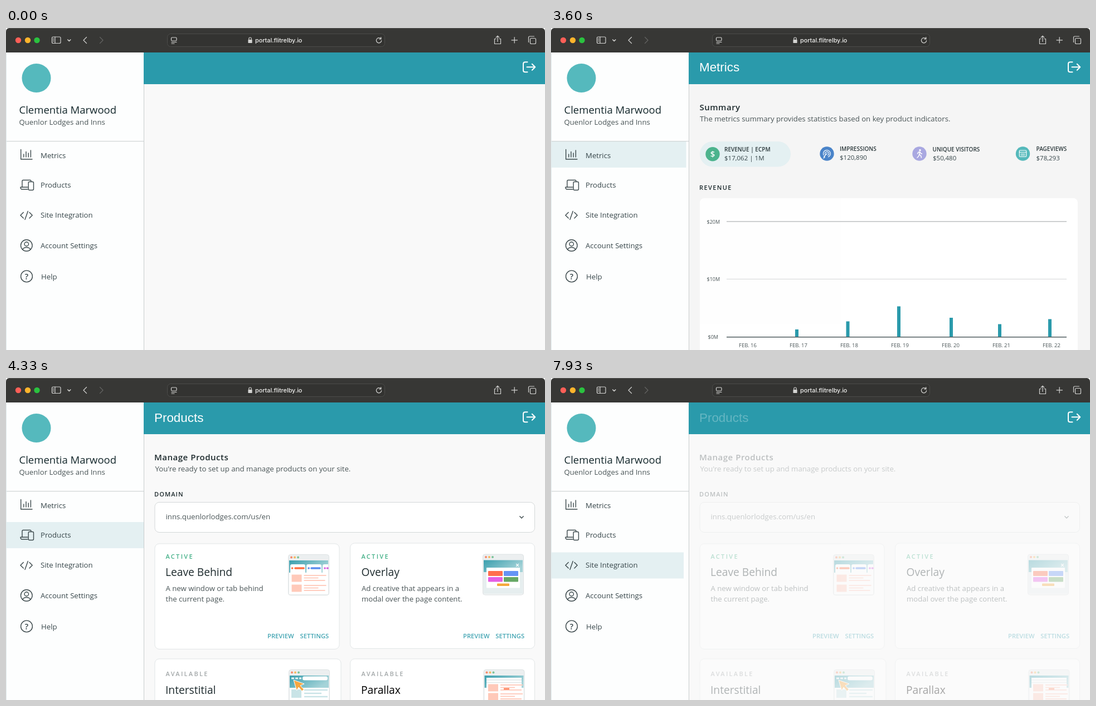
An HTML page that plays this animation: 967 px wide and 579 px high, repeating every 8 s.

```html
<!DOCTYPE html>
<html lang="en">
<head>
<meta charset="utf-8">
<title>Partner dashboard</title>
<style>
html, body { margin: 0; width: 100%; height: 100%; overflow: hidden; background: #fff; }
svg { display: block; width: 100vw; height: 100vh; }
text { font: 13.2px "Open Sans", sans-serif; fill: #4a5557; white-space: pre; }
.line { fill: none; stroke: #3b484b; stroke-width: 1.4; stroke-linecap: round; stroke-linejoin: round; }
.chrome { fill: none; stroke: #d4d4d2; stroke-width: 1.2; stroke-linecap: round; stroke-linejoin: round; }
.white { fill: none; stroke: #fff; stroke-width: 1.2; stroke-linecap: round; stroke-linejoin: round; }
.exit { stroke-width: 2; }
.url { font: 500 10.8px Inter, sans-serif; fill: #f2f2f0; }
.name { font-size: 18.5px; font-weight: 500; fill: #14282c; }
.menu text { fill: #37464a; }
.title { font: 22.4px "Liberation Sans", Arial, sans-serif; fill: #fff; }
.head { font-size: 15px; font-weight: 600; letter-spacing: .5px; fill: #1e2b2e; }
.label { font-size: 11px; font-weight: 600; letter-spacing: 1.1px; fill: #1e2b2e; }
.stat { font-size: 10px; font-weight: 600; fill: #2b383b; }
.value { font-size: 11.5px; fill: #37464a; }
.axis text { font-size: 9px; }
.days text { font-size: 9.5px; text-anchor: middle; }
.state { font-size: 11px; font-weight: 600; letter-spacing: 2.3px; fill: #a3a8a9; }
.on { fill: #43b087; }
.card { fill: #fff; stroke: #e1e5e6; }
.product { font-size: 19.2px; fill: #1e2b2e; }
.link { font-size: 11.2px; font-weight: 600; fill: #43a5b3; }

.mark { fill: #e4f0f2; }
.mark, .fade { animation: 8s linear infinite both; }
.mark { animation-timing-function: cubic-bezier(.455, .03, .515, .955); }
.mark1 { animation-name: mark1; }
.mark2 { animation-name: mark2; }
.mark3 { animation-name: mark3; }
.metrics { animation-name: metrics; }
.chart { animation-name: chart; }
.products { animation-name: products; }
.intro { animation-name: intro; }
.cards { animation-name: cards; }

@keyframes mark1 { 0%, .375% { transform: scaleX(0) } 6.625%, 44.58% { transform: none } 49.5%, 100% { transform: scaleX(0) } }
@keyframes mark2 { 0%, 49.7% { transform: scaleX(0) } 54.12%, 87.59% { transform: none } 93.84%, 100% { transform: scaleX(0) } }
@keyframes mark3 { 0%, 93.7% { transform: scaleX(0) } 99.95%, 100% { transform: none } }
@keyframes metrics { 0%, .8% { opacity: 0 } 7.2%, 45% { opacity: 1 } 49.4%, 100% { opacity: 0 } }
@keyframes chart { 0%, 2.5% { opacity: 0 } 8.3%, 45% { opacity: 1 } 49.4%, 100% { opacity: 0 } }
@keyframes products { 0%, 49.9% { opacity: 0 } 54.1%, 94.2% { opacity: 1 } 100% { opacity: .15 } }
@keyframes intro { 0%, 48% { opacity: 0 } 51.5%, 94.2% { opacity: 1 } 100% { opacity: .15 } }
@keyframes cards { 0%, 51% { opacity: 0 } 54.1%, 94.2% { opacity: 1 } 100% { opacity: .22 } }
</style>
</head>
<body>
<svg viewBox="0 0 967 579" preserveAspectRatio="none">
  <defs>
    <linearGradient id="teal" x2="1" y2=".5">
      <stop stop-color="#3a9fae"/><stop offset="1" stop-color="#a5d3d8"/>
    </linearGradient>
    <g id="window">
      <rect x=".5" y=".5" width="73" height="73" rx="4" fill="#eceff0" stroke="#dde2e3"/>
      <circle cx="6" cy="5.5" r="2" fill="#f58a6b"/>
      <circle cx="12" cy="5.5" r="2" fill="#f5b95f"/>
      <circle cx="18" cy="5.5" r="2" fill="#7cc39a"/>
      <rect x="2" y="12" width="70" height="60" fill="#fff"/>
      <rect x="2" y="11" width="70" height="22" fill="url(#teal)"/>
    </g>
    <g id="row">
      <rect width="18" height="13" fill="#ffc9b9"/>
      <path d="M22 1.5H62M22 6H48M22 10.5H60" stroke="#ffcdbf" stroke-width="2"/>
    </g>
  </defs>

  <!-- Page -->
  <rect width="967" height="579" fill="#fdfefe"/>
  <rect x="247" y="100" width="720" height="479" fill="#f9f9f9"/>
  <rect class="fade metrics" x="247" y="100" width="720" height="479" fill="#f5f5f5"/>
  <rect x="247" y="44" width="720" height="57" fill="#2a9aab"/>
  <g class="white exit">
    <path d="M935.5 61.2H931.5Q928 61.2 928 64.5V76Q928 79.3 931.5 79.3H935.5"/>
    <path d="M934.5 70.3H949.3M943.8 64.8L949.3 70.3L943.8 75.8"/>
  </g>

  <!-- Browser bar -->
  <path d="M0 44V7Q0 0 7 0H960Q967 0 967 7V44Z" fill="#373735"/>
  <path d="M7 .5H960" stroke="#5b5b59"/>
  <circle cx="22" cy="22" r="5.2" fill="#fe5f57"/>
  <circle cx="39" cy="22" r="5.2" fill="#fdb42c"/>
  <circle cx="55.5" cy="22" r="5.2" fill="#2ac23f"/>
  <rect x="289.5" y="10.5" width="390" height="23" rx="6" fill="#333331" stroke="#4c4c4a"/>
  <g class="chrome">
    <rect x="82.5" y="16" width="15.5" height="11.5" rx="2"/>
    <path d="M88 16V27.5M84.3 19H86M84.3 21.5H86M84.3 24H86"/>
    <path d="M110.8 21L113.3 23.5L115.8 21" stroke-width="1.6"/>
    <path d="M144.5 16.5L139 22L144.5 27.5"/>
    <path d="M168.5 16.5L174 22L168.5 27.5" stroke="#646462"/>
    <rect x="296.5" y="17" width="9.5" height="6" rx="1.5"/>
    <path d="M297 25.5H306M297 28H302"/>
    <path d="M435.8 21V19Q435.8 17 438 17T440.2 19V21"/>
    <rect x="435" y="21.5" width="6" height="5" fill="#d4d4d2"/>
    <path d="M672.5 19.3A4.6 4.6 0 1 0 673.6 22.5M669.6 19.8L673 20L672.7 16.5"/>
    <path d="M879 19.5H876.5V28.5H887.5V19.5H885M882 24.5V14.5M879 17.2L882 14.2L885 17.2"/>
    <path d="M907 21.8H917.5M912.2 16.5V27"/>
    <rect x="940.5" y="18.5" width="10" height="10" rx="2"/>
    <path d="M937.5 25.5V17Q937.5 15 939.5 15H947.5"/>
  </g>
  <text class="url" x="447" y="26">portal.flitrelby.io</text>

  <!-- Sidebar -->
  <rect class="mark mark1" y="204" width="247" height="47"/>
  <rect class="mark mark2" y="259" width="247" height="47"/>
  <rect class="mark mark3" y="313.5" width="247" height="47"/>
  <path d="M0 203.7H247M247.5 101V579" stroke="#c8cccd"/>
  <path d="M.5 44V579" stroke="#e0eaec"/>
  <circle cx="54.5" cy="90" r="26" fill="#55b9bd"/>
  <text class="name" x="23.5" y="153.5">Clementia Marwood</text>
  <text x="23.5" y="174" fill="#37464a">Quenlor Lodges and Inns</text>
  <g class="menu">
    <text x="62" y="234">Metrics</text>
    <text x="62" y="287">Products</text>
    <text x="62" y="341">Site Integration</text>
    <text x="62" y="396">Account Settings</text>
    <text x="63" y="451.5">Help</text>
    <text x="37" y="451.5" text-anchor="middle" style="font-size:14px;font-weight:600">?</text>
  </g>
  <g class="line">
    <path d="M26.7 218.5V236H47M31.8 227V232M36 222.5V232M40.2 225V232M44.4 220V232"/>
    <path d="M29 286V275.5Q29 273.5 31 273.5H43Q45 273.5 45 275.5M39 286.3H26Q26 290 29 290H39"/>
    <rect x="40.2" y="276.5" width="9.3" height="15" rx="2"/>
    <path d="M31.3 331.5L26 336.7L31.3 342M42 331.5L47.2 336.7L42 342M39.3 329.5L34 344.5"/>
    <circle cx="36.8" cy="391" r="10.3"/>
    <circle cx="36.8" cy="388.5" r="3.7"/>
    <path d="M29.7 398Q32 394.5 36.8 394.5T44 398"/>
    <circle cx="37" cy="446.5" r="10.4"/>
  </g>

  <!-- Metrics -->
  <g class="fade metrics">
    <text class="title" x="266" y="78.3">Metrics</text>
    <text class="head" x="266.5" y="147.5">Summary</text>
    <text x="267" y="168.3" fill="#5c6567">The metrics summary provides statistics based on key product indicators.</text>
    <rect x="267" y="204" width="163" height="45.5" rx="22.7" fill="#e4f0f2"/>
    <circle cx="290" cy="226.7" r="12.7" fill="#4bb38d"/>
    <circle cx="495" cy="226" r="12.7" fill="#4a84c9"/>
    <circle cx="661" cy="226" r="12.7" fill="#a9a8e1"/>
    <circle cx="846.5" cy="226" r="12.7" fill="#55b9bb"/>
    <text x="290" y="232" text-anchor="middle" style="font-size:15px;font-weight:600;fill:#fff">$</text>
    <g class="white">
      <path d="M489 228.5A6.4 6.4 0 1 1 497.5 231.8M492 227.2A3.4 3.4 0 1 1 496.5 229M495.5 225.5L489.5 231.5M491.5 231.8L489 234"/>
      <circle cx="662" cy="219.8" r="1.2" fill="#fff"/>
      <path d="M657.5 226L659 223.3L662 222.8L663.2 225.3L665.5 226.3M661.5 223L660.7 227.3L663.5 229.5L664.5 233M660.5 228L659.5 230.8L657 233" stroke-width="1.5"/>
      <rect x="840.3" y="220" width="12.4" height="11.5" rx="1.5"/>
      <path d="M840.3 223.5H852.7M843 226.5H850M843 229H850"/>
    </g>
    <text class="stat" x="311" y="222">REVENUE | ECPM</text>
    <text class="stat" x="518" y="221.3">IMPRESSIONS</text>
    <text class="stat" x="684.5" y="222">UNIQUE VISITORS</text>
    <text class="stat" x="870.5" y="221.3">PAGEVIEWS</text>
    <text class="value" x="311" y="238.3">$17,062 | 1M</text>
    <text class="value" x="518" y="237.3">$120,890</text>
    <text class="value" x="685" y="238">$50,480</text>
    <text class="value" x="870.5" y="238">$78,293</text>
  </g>
  <g class="fade chart">
    <text class="label" x="266" y="290.5" style="letter-spacing:1.4px">REVENUE</text>
    <rect x="267" y="306" width="678" height="290" rx="8" fill="#fff"/>
    <path d="M315 348H925" stroke="#bcbfc0" stroke-width="1.4"/>
    <path d="M315 451.5H925" stroke="#d4d6d7"/>
    <path d="M441 555V542M532.5 555V527.5M624 555V500.5M718 555V521M805 555V532.5M895 555V523.5" stroke="#2a9aab" stroke-width="6"/>
    <path d="M315 555.7H925" stroke="#4f5c5f" stroke-width="1.4"/>
    <g class="axis">
      <text x="279.5" y="351.7">$20M</text>
      <text x="279.5" y="455.2">$10M</text>
      <text x="281.5" y="559">$0M</text>
    </g>
    <g class="days">
      <text x="353" y="574">FEB. 16</text>
      <text x="444" y="574">FEB. 17</text>
      <text x="535" y="574">FEB. 18</text>
      <text x="626" y="574">FEB. 19</text>
      <text x="717" y="574">FEB. 20</text>
      <text x="808" y="574">FEB. 21</text>
      <text x="898" y="574">FEB. 22</text>
    </g>
  </g>

  <!-- Products -->
  <text class="title fade products" x="266" y="79.3">Products</text>
  <g class="fade intro">
    <text class="head" x="266" y="147.5">Manage Products</text>
    <text x="267.5" y="168.3">You're ready to set up and manage products on your site.</text>
    <text class="label" x="266" y="212.5">DOMAIN</text>
    <rect x="267" y="223.5" width="681.5" height="54" rx="8" fill="#fff" stroke="#d3d7d8"/>
    <text x="286.5" y="254">inns.quenlorlodges.com/us/en</text>
    <path class="line" d="M921.8 248.8L925 252L928.2 248.8"/>
  </g>
  <g class="fade cards">
    <rect class="card" x="267" y="298" width="331" height="189.5" rx="8"/>
    <rect class="card" x="617.5" y="297" width="331" height="189.5" rx="8"/>
    <rect class="card" x="267" y="505" width="334" height="190" rx="8"/>
    <rect class="card" x="617.5" y="505" width="331" height="190" rx="8"/>
    <text class="state on" x="286.5" y="324.7">ACTIVE</text>
    <text class="state on" x="637.5" y="324.7">ACTIVE</text>
    <text class="state" x="286.5" y="535.7">AVAILABLE</text>
    <text class="state" x="637.5" y="535.7">AVAILABLE</text>
    <text class="product" x="286" y="355.8">Leave Behind</text>
    <text class="product" x="637.5" y="355.8">Overlay</text>
    <text class="product" x="286" y="567.8">Interstitial</text>
    <text class="product" x="637" y="567.8" style="fill:#000;font-weight:500">Parallax</text>
    <text x="286.5" y="383">A new window or tab behind</text>
    <text x="286.5" y="402">the current page.</text>
    <text x="638" y="383">Ad creative that appears in a</text>
    <text x="638" y="402">modal over the page content.</text>
    <text class="link" x="469" y="467.8">PREVIEW</text>
    <text class="link" x="527.5" y="467.8">SETTINGS</text>
    <text class="link" x="820" y="467.8">PREVIEW</text>
    <text class="link" x="878.3" y="467.8">SETTINGS</text>

    <!-- Leave-behind thumbnail -->
    <use href="#window" x="506" y="317"/>
    <path d="M510 351V338Q510 335 513 335H534Q537 335 537 338V351ZM539 351V338Q539 335 542 335H563Q566 335 566 338V351ZM568 351V338Q568 335 571 335H578V351Z" fill="#fff"/>
    <g stroke-width="3.6" stroke-linecap="round">
      <path d="M513.5 342H513.6M519 342H534" stroke="#ff7043"/>
      <path d="M543 342H543.1M548 342H563" stroke="#5b8def"/>
      <path d="M572 342H572.1M576.5 342H577" stroke="#d65fe0"/>
    </g>
    <use href="#row" x="512.5" y="353.5"/>
    <use href="#row" x="512.5" y="371.5"/>

    <!-- Overlay thumbnail -->
    <use href="#window" x="855" y="316.5"/>
    <rect x="857" y="349" width="70" height="39" fill="#e6eeef"/>
    <rect x="862" y="341" width="60" height="36.5" rx="1" fill="#fff"/>
    <path class="white" d="M915.5 334.5L919.5 338.5M919.5 334.5L915.5 338.5"/>
    <rect x="865" y="347" width="26" height="9" rx="1" fill="#ff6f4d"/>
    <rect x="893" y="347" width="26" height="9" rx="1" fill="#6593f5"/>
    <rect x="865" y="358" width="26" height="8.5" rx="1" fill="#e45fe4"/>
    <rect x="893" y="358" width="26" height="8.5" rx="1" fill="#66a865"/>
    <rect x="881" y="369.5" width="22" height="4.5" rx="1" fill="#f5a83c"/>

    <!-- Interstitial thumbnail -->
    <use href="#window" x="507" y="524"/>
    <rect x="532" y="536.5" width="45" height="7" rx="3" fill="#fff"/>
    <path d="M512 540H517M519 540H524M526 540H530" stroke="#e9f3f4" stroke-width="3"/>
    <path d="M512 560H530V575H512Z" fill="#c9e4e7"/>
    <path d="M535 561H577M535 567H566M535 573H577" stroke="#c9e4e7" stroke-width="2.5"/>
    <path d="M516 543L535 550L528 553L534.5 560L531 563L525 556L521.5 562Z" fill="#f5a742" stroke="#fff"/>

    <!-- Parallax thumbnail -->
    <use href="#window" x="856.5" y="524"/>
    <path d="M862 539H925V579H862Z" fill="#fff"/>
    <path d="M862 543H925M862 547.5H925" stroke="#dfe6e7" stroke-width="1.5"/>
    <use href="#row" x="865" y="550.5"/>
    <use href="#row" x="865" y="566.5"/>
    <path d="M893 559H903" stroke="#ff8a66" stroke-width="3"/>
  </g>
</svg>
</body>
</html>
```
